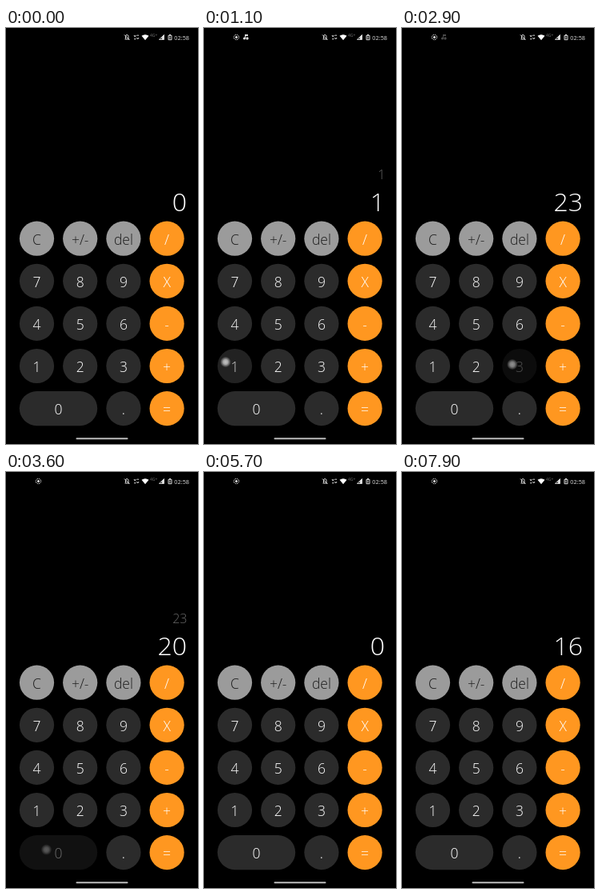
Recreate the animation shown at these times as an HTML page. Size 240x520 px, loop 8 s.

```html
<!DOCTYPE html>
<html lang="en">
<head>
<meta charset="utf-8">
<title>Calculator</title>
<style>
html, body { margin: 0; width: 100%; height: 100%; overflow: hidden; background: #000; }
svg { display: block; width: 240px; height: 520px; font-family: "Open Sans", Roboto, sans-serif; }
.key { font-size: 17.5px; font-weight: 350; text-anchor: middle; fill: #fff; }
.gray { fill: #1c1c1c; }
.right { text-anchor: end; font-weight: 300; }
</style>
</head>
<body>
<svg viewBox="0 0 240 520">
  <defs>
    <radialGradient id="touch">
      <stop offset="0" stop-color="#c4c4c4"/>
      <stop offset=".45" stop-color="#a8a8a8"/>
      <stop offset=".7" stop-color="#777" stop-opacity=".9"/>
      <stop offset="1" stop-color="#555" stop-opacity=".35"/>
    </radialGradient>
  </defs>
  <g fill="none" stroke="#ddd">
    <g id="record">
      <circle cx="40.5" cy="11.5" r="3.2" stroke-dasharray="1.6 .9"/>
      <circle cx="40.5" cy="11.5" r="1.5" fill="#eee" stroke="none"/>
    </g>
    <g id="note" fill="#ddd" stroke="none">
      <path d="M51 8h4v2h-3v3h-1z"/>
      <circle cx="50.5" cy="13" r="1.6"/>
      <circle cx="54" cy="13" r="1.7"/>
    </g>
    <path d="M148.5 14h5.5M149.5 13.5v-3q0-2 1.7-2t1.8 2v3M148 8.5l6.5 6.5"/>
    <path d="M160 9l1.2 2 1.2-2M163.5 9.2h2.5M160 13.8h2.5M163.5 12l1.2 2 1.3-2"/>
    <path d="M169.5 9.8q4.5-3.3 9 0L174 15.2z" fill="#fff" stroke="none"/>
    <path d="M191.5 14.5h6v-6z" stroke-width=".9"/>
    <path d="M194.5 14.5h3v-6l-3 3z" fill="#ddd" stroke="none"/>
    <path d="M203 9.3h4v5.4h-4zM204 8.5h2M204.9 10.5v3"/>
  </g>
  <text x="180" y="11" font-size="5" fill="#777">4G+</text>
  <text class="right" x="229" y="14.5" font-size="7.3" fill="#ddd" style="font-weight:400">02:58</text>
  <text id="past" class="right" x="226.5" y="189" font-size="16" fill="#666"></text>
  <text id="main" class="right" x="226" y="229" font-size="32" fill="#fff"></text>
  <g id="keys"></g>
  <circle id="dot" r="6.5" fill="url(#touch)"/>
  <rect x="87.5" y="512.2" width="65" height="2" rx="1" fill="#bbb"/>
</svg>
<script>
const LOOP = 8000, FADE_IN = 100, FADE_OUT = 170, R = 21.6;
const $ = id => document.getElementById(id);
const clamp = v => Math.max(0, Math.min(1, v));
const keys = {};

function make(tag, attrs, parent) {
  const el = document.createElementNS("http://www.w3.org/2000/svg", tag);
  for (const a in attrs) el.setAttribute(a, attrs[a]);
  return parent.appendChild(el);
}

const rows = [["C", "+/-", "del", "/"], ["7", "8", "9", "X"], ["4", "5", "6", "-"],
              ["1", "2", "3", "+"], ["0", "", ".", "="]];
rows.forEach((row, r) => row.forEach((label, c) => {
  if (!label) return;
  const wide = label === "0", x = wide ? 65.5 : 38.5 + c * 54.2, y = 263.2 + r * 53.1;
  const w = wide ? 97.4 : 2 * R;
  const gray = r === 0 && c < 3;
  const el = make("g", { class: gray ? "key gray" : "key" }, $("keys"));
  make("rect", { x: x - w / 2, y: y - R, width: w, height: 2 * R, rx: R,
                 fill: c === 3 ? "#ff9720" : gray ? "#9b9b9b" : "#2b2b2b" }, el);
  make("text", { x, y: y + 7.8 }, el).textContent = label;
  keys[label] = { el, x, y };
}));

// key, finger down, finger up, optional touch offset and dot linger
const taps = [
  ["1", 280, 380], ["+", 600, 700], ["1", 870, 972, -11.5, -5, 130], ["=", 1400, 1490],
  ["C", 1980, 2130, -11.5, -2],
  ["2", 2480, 2570], ["3", 2800, 2880], ["+", 3060, 3140], ["2", 3300, 3380],
  ["0", 3480, 3557, -15, -3.5], ["=", 3880, 3960],
  ["-", 4230, 4310], ["5", 4500, 4650, -8.5, 0.5], ["=", 5020, 5100], ["C", 5515, 5530],
  ["4", 5900, 5980], ["X", 6330, 6470], ["4", 6700, 6780], ["=", 6960, 7040]
];

function calculate(t) {
  let main = "0", past = "", op = "";
  for (const [key, , up] of taps) {
    if (up > t) break;
    if (key === "C") main = "0", past = op = "";
    else if (key === "=") {
      const a = +past, b = +main;
      main = String(op === "+" ? a + b : op === "-" ? a - b : a * b);
      past = op = "";
    } else if ("+-X/".includes(key)) past = main, main = "0", op = key;
    else main = main === "0" ? key : main + key;
  }
  return [main, past];
}

function draw(now) {
  const t = now % LOOP;
  const [main, past] = calculate(t);
  $("main").textContent = main;
  $("past").textContent = past;
  $("record").setAttribute("opacity", clamp((t - 60) / 120));
  $("note").setAttribute("opacity", clamp((t - 60) / 120) * clamp((2950 - t) / 150));

  const fade = {};
  let glow = 0;
  for (const [key, down, up, dx = -9, dy = -2, linger = 0] of taps) {
    if (t < down) break;
    const dip = 0.8 * clamp((t - down) / FADE_IN) * (1 - clamp((t - up) / FADE_OUT));
    fade[key] = Math.max(fade[key] || 0, dip);
    const a = 1 - clamp((t - up - linger) / 75);
    if (a > 0) {
      glow = a;
      $("dot").setAttribute("cx", keys[key].x + dx);
      $("dot").setAttribute("cy", keys[key].y + dy);
    }
  }
  for (const k in keys) keys[k].el.setAttribute("opacity", 1 - (fade[k] || 0));
  $("dot").setAttribute("opacity", glow);
}

const start = performance.now();
function tick() {
  draw(performance.now() - start);
  requestAnimationFrame(tick);
}
tick();
</script>
</body>
</html>
```
